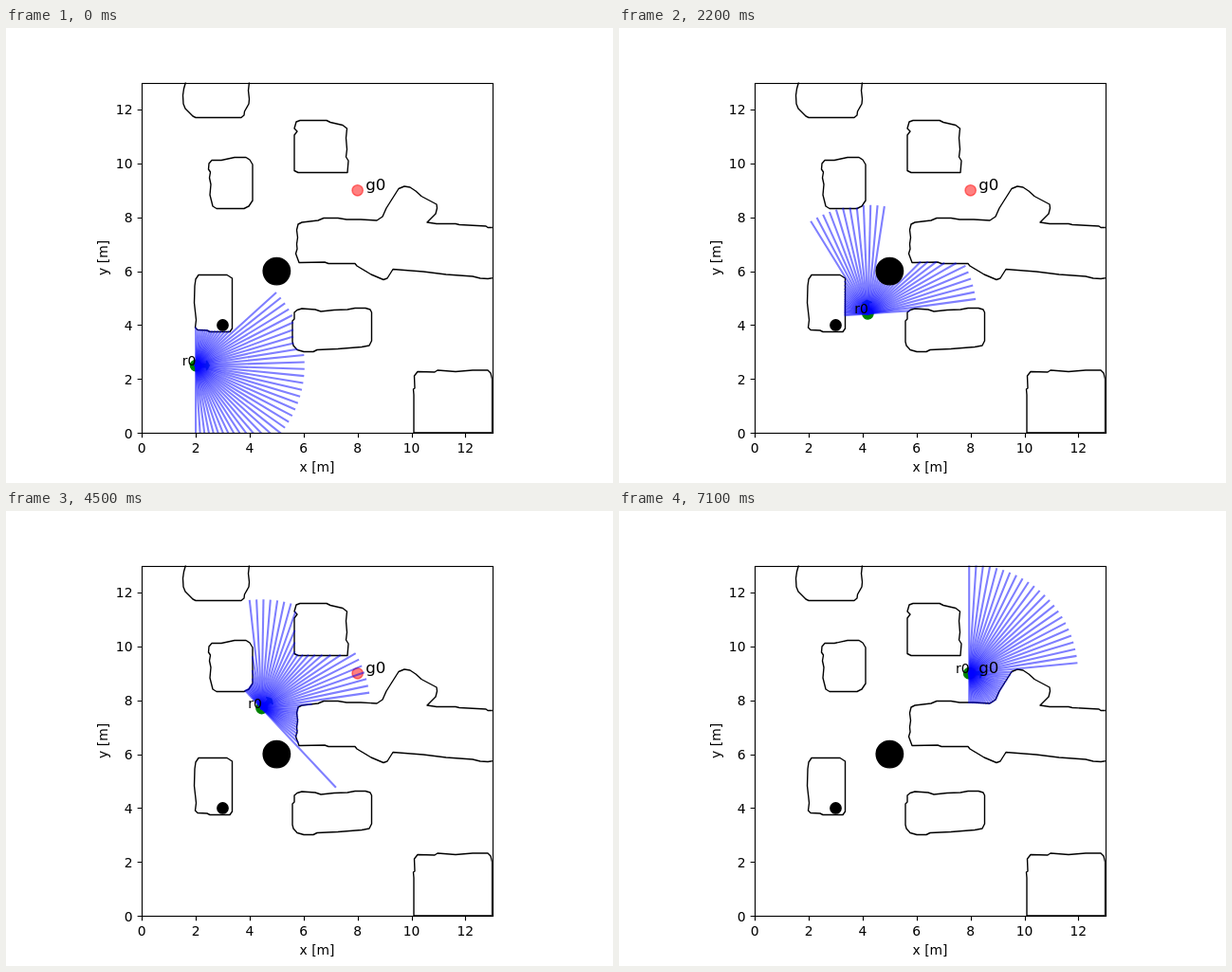
Recreate the animation shown at these times as an HTML page. Size 640 by 480 pixels, loop 8000 ms.

```html
<!DOCTYPE html>
<html lang="en">
<head>
<meta charset="utf-8">
<title>Robot with lidar</title>
<style>
html, body { margin: 0; width: 100%; height: 100%; overflow: hidden; background: #fff; }
svg { display: block; width: 640px; height: 480px; }
text { font: 13.89px "DejaVu Sans", sans-serif; fill: #000; }
#walls path { fill: none; stroke: #000; stroke-width: 1.4; stroke-linejoin: round; }
#rays line { stroke: #00f; stroke-opacity: .5; stroke-width: 2.08; stroke-linecap: square; }
#axes { fill: none; stroke: #000; stroke-width: 1.11; }
.end { text-anchor: end; }
.mid { text-anchor: middle; }
</style>
</head>
<body>
<svg viewBox="0 0 640 480">
  <clipPath id="area"><rect x="143.2" y="57.6" width="369.6" height="369.6"/></clipPath>
  <g clip-path="url(#area)">
    <g id="walls">
      <path d="M189.5 57L187.5 64L186.5 71L187 80L189 85L197 93L200 94.5H248L251 92L251.5 88L256 80L256.5 75L255.5 66L256.5 57"/>
      <path d="M310 97.5L338 97.5L342 99.5L355 102.5L359.5 106L358.5 116L359.5 128L358.5 136L361 140L360 152.5L308 152.5L304 150.5L304 113L307 109L304 106L306 99Z"/>
      <path d="M217 139.5L227 139.5L241 136.5L253 136.5L257 139L260 144L260 182L256 188L251 190.5L222 190.5L218 188L215 176L216 165L214.5 158L215.5 152L213.5 149L214 143Z"/>
      <path d="M203 260.5L233 260.5L238.5 264L238.5 317L236 320.5L215 320.5L212 319L202 318.5L199.5 316L200.5 308L198.5 290L199 272L200 265Z"/>
      <path d="M307 297.5L312 296L326 297L332 299L346 297.5L360 297L368 295.5L379 295.5L384 297L385.5 300L385.5 330L383 335L375 336.5L350 338.5L328 339.5L324 341.5L314 341.5L307 339.5L303 335L302 331L302 309L304 307L304 300Z"/>
      <path d="M430 427L430 387L429.5 381L431 380L430.5 367L434 362.5L452 363L455 361L474 362.5L492 361L508 361L511 364L512.5 370L512.5 427Z"/>
      <path d="M514 210.5L508 210.5L506 209L478 207.5L474 206.5L454 206.5L444 205L453 196L454.5 190L454 186L438 177.5L432 172L426 168L420 167L414 169.5L401 190L397 199L391 203L374 202L359 202L350 200.5L335 200.5L329 203L312 205L308 207L306.5 213L307.5 221L306.5 228L307 233L305.5 238L309 247.5L336 247L340 248.5L368 248.5L370 251L385 260L398 265.5L402 264L408 254.5L440 257L464 260L492 262L500 264L508 264.5L514 263.5"/>
    </g>
    <circle cx="370.65" cy="171.3" r="5.69" fill="#f00" stroke="#f00" stroke-width="1.39" fill-opacity=".5" stroke-opacity=".5"/>
    <g id="robot">
      <circle r="5.69" fill="#008000" stroke="#008000" stroke-width="1.39"/>
      <path d="M0 1.7V-1.7H11.4V-5.1L14.2 0L11.4 5.1V1.7Z" fill="#1f77b4" stroke="#1f77b4" stroke-width="1.39"/>
    </g>
    <g id="rays"></g>
    <g id="discs" stroke="#000" stroke-width="1.39"></g>
  </g>
  <g id="axes"><rect x="143.5" y="58.5" width="370" height="369"/></g>
  <g id="labels">
    <text class="mid" x="328" y="468">x [m]</text>
    <text class="mid" transform="translate(106.5 242.4) rotate(-90)">y [m]</text>
    <text x="379.2" y="171.3" style="font-size:16.67px">g0</text>
    <text id="name">r0</text>
  </g>
</svg>
<script>
const $ = id => document.getElementById(id);
const UNIT = 369.6 / 13, RANGE = 4 * UNIT, BEAMS = 50, STEP = 100, LOOP = 8000;
const SPEED = 4.2; // pixels per step
const px = x => 143.2 + UNIT * x, py = y => 427.2 - UNIT * y;

function add(parent, tag, attrs, text) {
  const el = document.createElementNS("http://www.w3.org/2000/svg", tag);
  for (const k in attrs) el.setAttribute(k, attrs[k]);
  if (text !== undefined) el.textContent = text;
  return $(parent).appendChild(el);
}

for (let v = 0; v <= 12; v += 2) {
  const x = Math.round(px(v)) + 0.5, y = Math.round(py(v)) + 0.5;
  add("axes", "path", { d: `M${x} 427.5v4.86M143.5 ${y}h-4.86` });
  add("labels", "text", { class: "mid", x: px(v), y: 448 }, v);
  add("labels", "text", { class: "end", x: 133.5, y: py(v) + 5.3 }, v);
}

const discs = [[3, 4, 0.2], [5, 6, 0.5]].map(([x, y, r]) => ({ x: px(x), y: py(y), r: r * UNIT }));
for (const d of discs) add("discs", "circle", { cx: d.x, cy: d.y, r: d.r });

// Wall segments, read from the drawn outlines
const segs = [];
for (const path of document.querySelectorAll("#walls path")) {
  const d = path.getAttribute("d").replace("H248", "L248 94.5");
  const n = d.match(/[\d.]+/g).map(Number), pts = [];
  for (let i = 0; i < n.length; i += 2) pts.push([n[i], n[i + 1]]);
  pts.forEach((p, i) => segs.push([p, pts[(i + 1) % pts.length]]));
}

const rays = Array.from({ length: BEAMS }, () => add("rays", "line", {}));

function cast(x, y, dx, dy) {
  let best = RANGE;
  for (const [a, b] of segs) {
    const ex = b[0] - a[0], ey = b[1] - a[1];
    const ax = a[0] - x, ay = a[1] - y;
    const det = dx * ey - dy * ex;
    if (!det) continue;
    const t = (ax * ey - ay * ex) / det, s = (ax * dy - ay * dx) / det;
    if (t > 0 && t < best && s >= 0 && s <= 1) best = t;
  }
  for (const c of discs) {
    const mx = c.x - x, my = c.y - y;
    const along = mx * dx + my * dy;
    const h = c.r * c.r - (mx * mx + my * my - along * along);
    if (h > 0 && along > 0) best = Math.min(best, along - Math.sqrt(h));
  }
  return Math.max(best, 0);
}

// step, x, y, heading in degrees
const route = [
  [0, 200.06, 356.1, 0],
  [14, 252.5, 333.3, 51.2],
  [22, 262.4, 301.4, 94.1],
  [28, 258, 276.7, 104.5],
  [34, 254, 251.3, 86.2],
  [40, 258.5, 226.5, 73],
  [45, 269.5, 208, 43.1],
  [53, 295.5, 185, 34.7],
  [57, 310.5, 177.6, 18],
  [61, 327, 174, 8],
  [66, 348.2, 171.8, 5],
  [71, 369.2, 171.2, 0]
];
const rad = deg => deg * Math.PI / 180;

function pose(step) {
  let i = 0;
  while (i < route.length - 2 && step > route[i + 1][0]) i++;
  const [s0, x0, y0, h0] = route[i], [s1, x1, y1, h1] = route[i + 1];
  const n = s1 - s0, u = (step - s0) / n, m = SPEED * n;
  const hermite = (a, b, va, vb) =>
    a + u * u * (3 - 2 * u) * (b - a) + u * (1 - u) * ((1 - u) * va - u * vb);
  return {
    x: hermite(x0, x1, m * Math.cos(rad(h0)), m * Math.cos(rad(h1))),
    y: hermite(y0, y1, -m * Math.sin(rad(h0)), -m * Math.sin(rad(h1))),
    h: h0 + (h1 - h0) * u
  };
}

function set(el, attrs) {
  for (const k in attrs) el.setAttribute(k, attrs[k].toFixed(2));
}

function draw(step) {
  const { x, y, h } = pose(step);
  $("robot").setAttribute("transform", `translate(${x} ${y}) rotate(${-h})`);
  set($("name"), { x: x - UNIT / 2, y });
  rays.forEach((ray, i) => {
    const a = rad(h - 90 + 180 * i / (BEAMS - 1));
    const dx = Math.cos(a), dy = -Math.sin(a), len = cast(x, y, dx, dy);
    set(ray, { x1: x, y1: y, x2: x + dx * len, y2: y + dy * len });
  });
}

const start = performance.now();
let shown = -1;
function tick() {
  const t = (performance.now() - start) % LOOP;
  const step = Math.min(71, Math.floor(t / STEP));
  if (step !== shown) draw(shown = step);
  requestAnimationFrame(tick);
}
tick();
</script>
</body>
</html>
```
